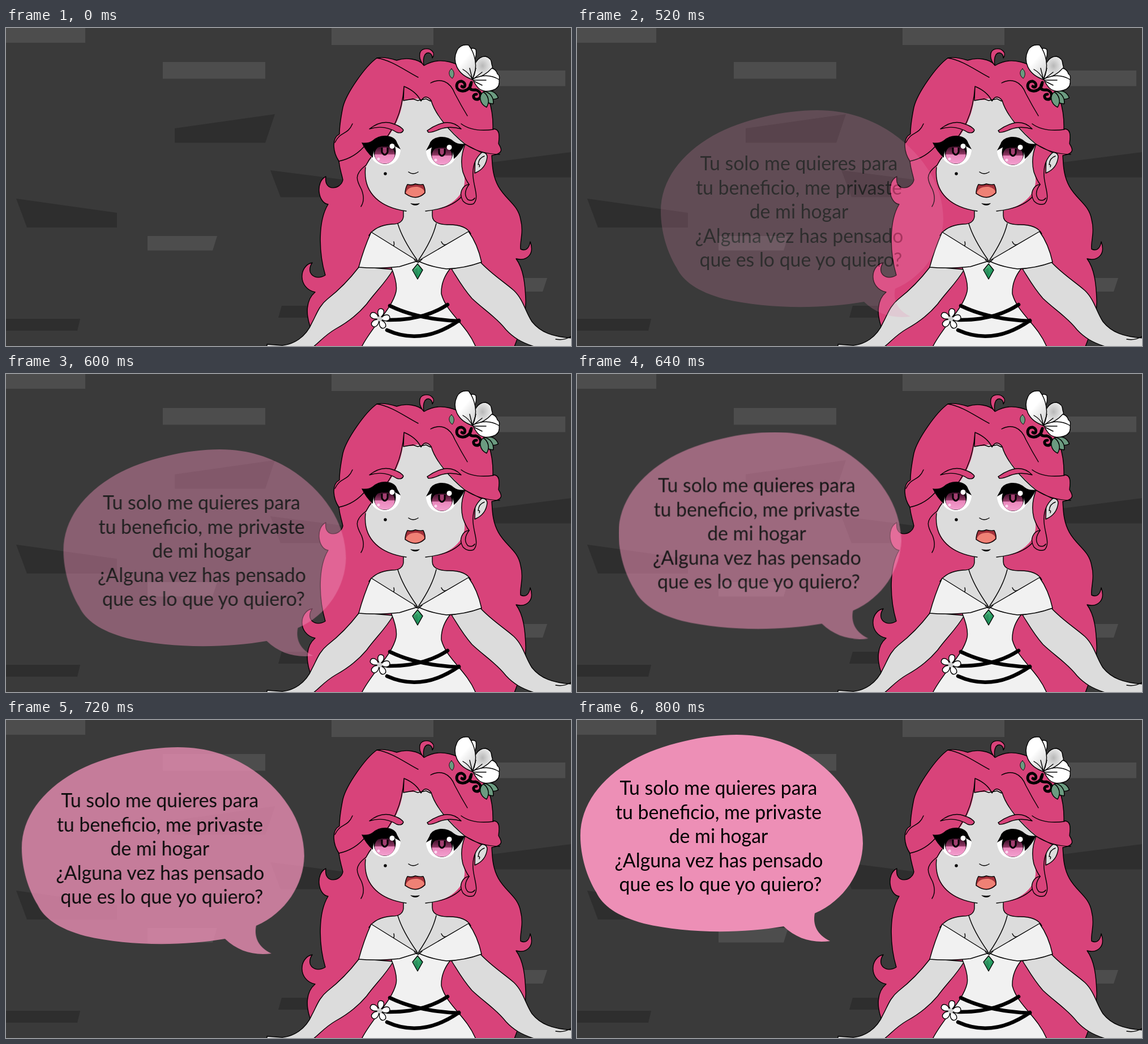
Animation of 998x561 px, one loop 4.84 s. Source, as an HTML page without scripts:

```html
<!DOCTYPE html>
<html lang="es">
<head>
<meta charset="utf-8">
<title>Globo de diálogo</title>
<style>
html, body { margin: 0; width: 100%; height: 100%; overflow: hidden; background: #3a3a3a; }
svg { display: block; width: 100%; height: 100%; }
.ink { stroke: #000; stroke-width: 1.4; stroke-linejoin: round; stroke-linecap: round; }
.line { fill: none; }
.hair { fill: #d8437a; }
.skin { fill: #dcdcdc; }
.cloth { fill: #f1f1f1; }
.light { fill: #4d4d4d; }
.dark { fill: #2e2e2e; }
.band { fill: none; stroke: #000; stroke-width: 6.5; stroke-linecap: round; }
.swirl { fill: none; stroke: #000; stroke-width: 5; stroke-linecap: round; }
text { font: 33.8px Lato, "Open Sans", sans-serif; text-anchor: middle; }

/* nine 40 ms steps after a 480 ms wait */
#bubble { animation: enter 4.84s step-end infinite; }
@keyframes enter {
  0%      { opacity: 0;    transform: translate(145px, 90px); }
  9.917%  { opacity: .111; transform: translate(145px, 90px); }
  10.743% { opacity: .222; transform: translate(142px, 119px); }
  11.57%  { opacity: .333; transform: translate(126.5px, 130px); }
  12.396% { opacity: .444; transform: translate(95.5px, 107px); }
  13.223% { opacity: .556; transform: translate(67.5px, 76.5px); }
  14.049% { opacity: .667; transform: translate(43.5px, 47.5px); }
  14.876% { opacity: .778; transform: translate(21.8px, 22px); }
  15.702% { opacity: .889; transform: translate(9px, 8px); }
  16.528%, 100% { opacity: 1; transform: none; }
}
</style>
</head>
<body>
<svg viewBox="0 0 998 561" preserveAspectRatio="none">
  <defs>
    <linearGradient id="iris" x2="0" y2="1">
      <stop offset=".15" stop-color="#4a1532"/>
      <stop offset=".48" stop-color="#8f3763"/>
      <stop offset=".52" stop-color="#e986bb"/>
      <stop offset="1" stop-color="#f3a0cf"/>
    </linearGradient>
    <radialGradient id="petal" cx=".5" cy=".4" r=".6">
      <stop stop-color="#b8b8b8"/>
      <stop offset="1" stop-color="#fff"/>
    </radialGradient>
    <linearGradient id="shade" x1=".2" x2=".9" y2="1">
      <stop offset=".4" stop-color="#fff"/>
      <stop offset="1" stop-color="#ccc"/>
    </linearGradient>
    <linearGradient id="gem" x2="1" y2="1">
      <stop stop-color="#6fcf97"/>
      <stop offset=".6" stop-color="#259a60"/>
    </linearGradient>
    <g id="lid">
      <path fill="#fff" d="M643 214Q643 237 664 242Q692 245 697 217Q694 204 684 198Q660 192 645 203Z"/>
      <path d="M628 202Q640 204 648 198Q658 189 672 190Q688 192 691 203L697 214Q688 209 684 207Q668 199 655 207Q648 216 648 229Q636 219 628 202Z"/>
    </g>
    <g id="eye">
      <ellipse cx="669" cy="218" rx="19.500" ry="22"/>
      <ellipse cx="669" cy="223" rx="17.800" ry="16.500" fill="url(#iris)"/>
      <path d="M650 213Q669 205 688 213Q685 195 669 195Q653 195 650 213Z"/>
      <path d="M664 211V219Q669 228 674 219V211" fill="#a23f70" stroke="#000" stroke-width="3"/>
      <circle cx="682" cy="208.500" r="4.500" fill="#fff"/>
      <circle cx="658" cy="231" r="2.500" fill="#fbd7ee"/>
    </g>
    <path id="leaf" d="M0 0C-9 5 -9 19 2 26C9 18 8 6 0 0Z"/>
    <path id="bloom" d="M0 -2C-8 -9 -6 -18 0 -18S8 -9 0 -2Z"/>
  </defs>

  <rect width="998" height="561" fill="#3a3a3a"/>
  <path class="light" d="M0 0H140V26H0ZM277 60H458V89.500H277ZM575 0H755V30H575ZM850 75H988V102.500H850ZM250 367H373L365 392.500H250ZM900 441H956L948 465H900Z"/>
  <path class="dark" d="M298 177L475 152L458 202.500H298ZM467 251L600 268V298.500H485ZM18 301L196 326V352H37ZM0 513H131L126 534H0ZM487 490H545V511H481ZM850 238L998 219V263.500H850Z"/>

  <!-- back hair -->
  <path class="hair ink" d="M655 53C635 67 601 115 595 140C591 160 589 175 589 187C574 195 578 220 588 235C590 252 593 257 595 268C592 285 561 290 565 262C546 271 551 309 569 311C551 340 552 395 564 436C547 447 528 433 541 414C517 419 515 459 546 466C529 480 530 505 537 526L552 540L540 562H898C908 535 919 510 918 480C917 450 914 425 901 407C920 412 934 399 926 377C924 390 917 394 909 390C907 379 915 360 909 338C903 301 863 300 859 240L858 225C882 221 874 211 870 204C872 189 872 177 860 178C861 140 850 110 831 88C800 58 765 50 739 66C728 53 705 52 690 57Q668 50 655 53Z"/>

  <!-- neck and shoulders -->
  <path class="skin ink" d="M702 318V333Q700 346 682 346Q653 348 641 366L727 416L821 363Q812 346 779 347Q753 346 753 331V318Z"/>
  <path class="line ink" d="M685 377Q687 384 682 387M769 377Q772 384 778 382"/>

  <!-- arms -->
  <path class="skin ink" d="M624 421C604 447 586 464 568 478C553 490 549 504 541 519C529 547 507 558 488 560L461 558V563H542C555 553 563 542 582 531C604 519 621 506 637 487C652 466 670 450 684 426Z"/>
  <path class="skin ink" d="M838 413C856 433 880 448 897 463C914 479 918 502 929 518C944 537 966 545 1000 547V563H936C910 555 896 546 883 532C866 510 844 497 823 477C807 459 799 444 787 425Z"/>
  <path class="line ink" d="M971 549Q985 552 998 544"/>

  <!-- dress -->
  <path class="cloth ink" d="M680 421Q692 450 689 465C682 496 645 528 628 563H830C813 522 778 503 769 469Q768 445 785 424L728 411Z"/>
  <path class="cloth ink" d="M645 360L727 411L695 421Q655 425 623 422Q632 389 645 360Z"/>
  <path class="cloth ink" d="M817 359L728 411Q748 421 778 425Q810 424 840 413Q833 381 817 359Z"/>
  <path class="line ink" d="M692 345Q700 372 726 409M760 345Q753 374 729 409M721 409L728 414L735 408"/>
  <path class="ink" fill="url(#gem)" d="M727 416L736 427L727 443L718 427Z"/>
  <path d="M718 427L727 423V443Z" fill="#136b43" opacity=".4"/>
  <path class="band" d="M678 490Q727 514 800 517M780 488Q737 516 674 515M673 533Q735 561 800 516"/>
  <g transform="translate(660 513) rotate(10)" fill="#fff" class="ink">
    <use href="#bloom"/>
    <use href="#bloom" transform="rotate(72)"/>
    <use href="#bloom" transform="rotate(144)"/>
    <use href="#bloom" transform="rotate(216)"/>
    <use href="#bloom" transform="rotate(288)"/>
    <circle r="4.500" fill="#ccc" stroke="none"/>
  </g>

  <!-- face -->
  <path class="skin ink" d="M829 224Q848 214 850 227Q848 248 828 256Z"/>
  <path class="line ink" d="M845 226Q835 229 834 241Q838 240 836 245"/>
  <path class="skin" d="M701 127L719 127Q728 121 733 129Q740 118 751 128C757 150 784 181 811 204Q801 230 809 259C816 289 790 323 728 325C670 324 630 294 635 246Q642 231 655 217C678 192 697 162 701 127Z"/>
  <path class="line ink" d="M635 246C630 294 664 317 707 323M741 323Q788 318 806 296"/>
  <path class="line ink" d="M703 103C700 150 686 181 648 224Q641 232 636 242C613 259 620 270 628 285Q635 303 627 315M703 103Q725 112 733 129Q741 115 751 128C758 153 785 184 811 205M703 103L702 128L719 125L727 128L742 125L750 129"/>

  <!-- side lock -->
  <path class="hair ink" d="M811 205Q801 230 807 254Q812 268 818 276C806 277 799 292 807 305Q815 314 826 310C836 299 827 284 825 262Q823 235 840 220Z"/>
  <path class="line ink" d="M818 276Q806 292 816 303Q824 306 828 300M588 235Q617 229 636 205M612 169C603 190 591 181 581 202M804 169Q824 184 861 179M811 205Q836 222 872 223M655 53C680 56 708 77 728 87M750 97C767 88 784 93 793 116Q804 137 815 155"/>

  <path class="hair ink" d="M738 66C729 56 728 43 736 38C750 33 760 44 753 53C753 44 745 41 740 47Q736 54 738 66Z"/>

  <!-- eyes, brows, mouth -->
  <use href="#lid"/>
  <use href="#eye"/>
  <use href="#lid" transform="matrix(-1 0 0 1 1439 2)"/>
  <use href="#eye" transform="translate(101 2)"/>
  <g class="hair ink">
    <path d="M642 178Q660 164 677 167Q697 172 702 180Q700 187 690 184Q668 170 642 178Z"/>
    <path d="M744 181Q759 170 775 167Q792 165 804 178Q783 172 765 179Q751 185 746 184Z"/>
  </g>
  <path class="line ink" d="M711 254Q719 260 728 254"/>
  <circle cx="670" cy="257" r="2.700"/>
  <path class="ink" fill="#a4303a" d="M709 276Q717 278 723 275Q730 277 737 276Q741 284 740 291Q725 306 705 292Q705 283 709 276Z"/>
  <path fill="#ef8175" d="M706 291Q710 279 727 280Q739 283 739 290Q724 305 706 291Z"/>
  <path d="M714 309Q723 311 731 309Q728 313 723 313Q718 313 714 309Z"/>

  <!-- hair ornament -->
  <path class="swirl" d="M805 103C811 108 814 97 805 94C795 93 793 106 801 110C811 114 821 107 822 96M822 96C816 108 821 110 829 109C841 111 841 125 832 126C824 126 824 116 831 117"/>
  <g class="ink" fill="#6b9b80">
    <use href="#leaf" transform="translate(787 72) scale(.65)"/>
    <use href="#leaf" transform="translate(846 112) rotate(-60)"/>
    <use href="#leaf" transform="translate(844 112) rotate(-33) scale(1.05)"/>
    <use href="#leaf" transform="translate(843 113) rotate(-8) scale(1.05)"/>
  </g>
  <g class="ink" fill="#fff">
    <path d="M820 37Q826 34 830 38Q832 48 827 58L819 60Z"/>
    <path fill="url(#petal)" d="M824 91C824 63 833 50 847 50Q858 53 858 64Q864 80 846 92Z"/>
    <path d="M858 71Q866 73 868 81Q873 84 871 91L845 96L824 91Q846 85 858 71Z"/>
    <path d="M824 90Q850 78 871 91Q873 103 864 108Q849 115 837 108Q831 104 824 90Z"/>
    <path fill="url(#shade)" d="M824 91C797 82 787 59 797 39Q803 28 817 30C828 44 835 68 824 91Z"/>
    <path class="line" d="M807 73Q818 79 824 91L819 71M824 91L830 71M824 91L841 78M826 92L848 92M827 94L841 101"/>
  </g>

  <g id="bubble">
    <path fill="#ed8fb6" d="M6 204C6 150 42 103 98 71C150 42 225 26 282 26C335 26 373 41 405 60C465 98 505 155 505 218C504 268 473 318 420 341C416 361 424 379 447 390C416 394 388 386 365 364C290 377 195 377 118 359C70 346 45 327 34 304C18 278 6 241 6 204Z"/>
    <text x="250" y="132">Tu solo me quieres para</text>
    <text x="250" y="174.600">tu beneficio, me privaste</text>
    <text x="250" y="217.200">de mi hogar</text>
    <text x="250.500" y="259.800">¿Alguna vez has pensado</text>
    <text x="253.500" y="302.400">que es lo que yo quiero?</text>
  </g>
</svg>
</body>
</html>
```
